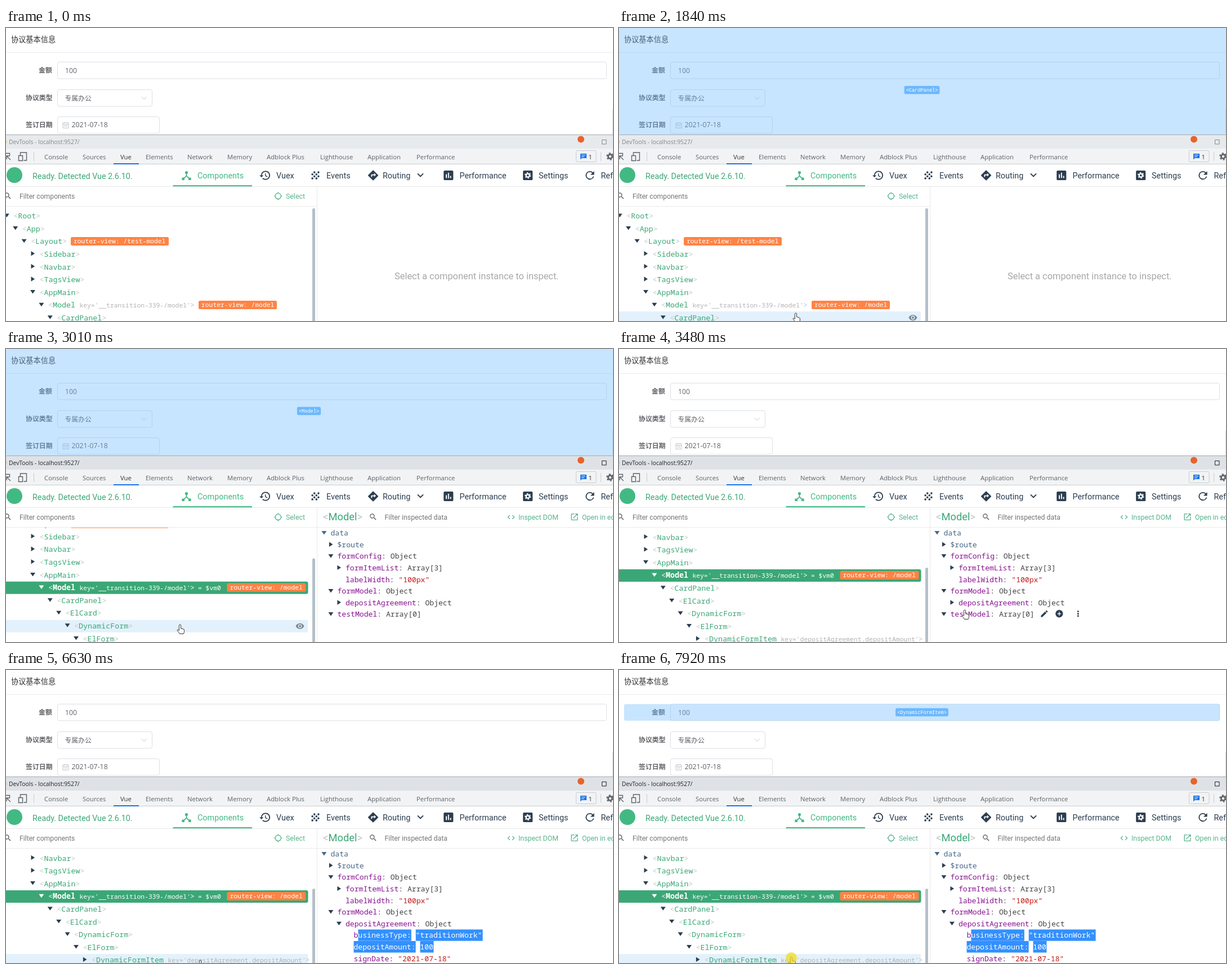
An HTML page for the animation above (8 s loop, 1078x520 px).

```html
<!DOCTYPE html>
<html lang="zh">
<head>
<meta charset="utf-8">
<style>
html, body { margin: 0; width: 100%; height: 100%; overflow: hidden; background: #fff }
svg { display: block; font-family: Roboto, sans-serif }
text { white-space: pre }
.mono { font-family: "Noto Sans Mono", monospace }
.open { font-family: "Open Sans", "Noto Sans", sans-serif }
.cjk { font-family: "Noto Sans CJK SC", "Noto Sans CJK", sans-serif }
.tip { font-family: "Liberation Mono", monospace }
</style>
</head>
<body>
<svg id="stage" width="1078" height="520" viewBox="0 0 1078 520"></svg>
<script>
const DARK = '#2c3e50', GREEN = '#42b983', NAME = '#3ba776', KEY = '#881391', PLAIN = '#444', RED = '#c41a16';
const LOOP = 8000, ROW = 22.6, TREE_TOP = 322.2, DATA_ROW = 20.6, DATA_TOP = 316.3;

const ICONS = {
  hub: 'M17 16l-4-4V8.82C14.16 8.4 15 7.3 15 6c0-1.66-1.34-3-3-3S9 4.34 9 6c0 1.3.84 2.4 2 2.82V12l-4 4H3v5h5v-3.05l4-4.2 4 4.2V21h5v-5z',
  history: 'M13 3a9 9 0 0 0-9 9H1l4 4 4-4H6a7 7 0 1 1 7 7c-1.93 0-3.68-.79-4.94-2.06l-1.42 1.42A9 9 0 1 0 13 3zm-1 5v5l4.28 2.54.72-1.21-3.5-2.08V8z',
  turn: 'M21.7 11.3l-9-9a1 1 0 0 0-1.4 0l-9 9a1 1 0 0 0 0 1.4l9 9a1 1 0 0 0 1.4 0l9-9a1 1 0 0 0 0-1.4zM14 14.5V12h-4v3H8v-4c0-.55.45-1 1-1h5V7.5l3.5 3.5z',
  down: 'M7.41 8.59L12 13.17l4.59-4.58L18 10l-6 6-6-6z',
  square: 'M19 3H5a2 2 0 0 0-2 2v14a2 2 0 0 0 2 2h14a2 2 0 0 0 2-2V5a2 2 0 0 0-2-2z',
  bars: 'M19 3H5a2 2 0 0 0-2 2v14a2 2 0 0 0 2 2h14a2 2 0 0 0 2-2V5a2 2 0 0 0-2-2zM9 17H7v-7h2zm4 0h-2V7h2zm4 0h-2v-4h2z',
  refresh: 'M17.65 6.35A8 8 0 1 0 19.73 14h-2.08A6 6 0 1 1 12 6c1.66 0 3.14.69 4.22 1.78L13 11h7V4z',
  search: 'M15.5 14h-.79l-.28-.27a6.5 6.5 0 1 0-.7.7l.27.28v.79l5 4.99L20.49 19zm-6 0a4.5 4.5 0 1 1 0-9 4.5 4.5 0 0 1 0 9z',
  code: 'M9.4 16.6L4.8 12l4.6-4.6L8 6l-6 6 6 6zm5.2 0l4.6-4.6-4.6-4.6L16 6l6 6-6 6z',
  open: 'M19 19H5V5h7V3H5a2 2 0 0 0-2 2v14a2 2 0 0 0 2 2h14a2 2 0 0 0 2-2v-7h-2zM14 3v2h3.59l-9.83 9.83 1.41 1.41L19 6.41V10h2V3z',
  edit: 'M3 17.25V21h3.75L17.81 9.94l-3.75-3.75zM20.71 7.04a1 1 0 0 0 0-1.41l-2.34-2.34a1 1 0 0 0-1.41 0l-1.83 1.83 3.75 3.75z',
  addCircle: 'M12 2a10 10 0 1 0 0 20 10 10 0 0 0 0-20zm5 11h-4v4h-2v-4H7v-2h4V7h2v4h4z',
  add: 'M19 13h-6v6h-2v-6H5v-2h6V5h2v6h6z',
  minus: 'M19 13H5v-2h14z',
  trash: 'M6 19a2 2 0 0 0 2 2h8a2 2 0 0 0 2-2V7H6zM19 4h-3.5l-1-1h-5l-1 1H5v2h14z',
  more: 'M10 4h4v4h-4zM10 10h4v4h-4zM10 16h4v4h-4z',
  eye: 'M12 4.5C7 4.5 2.73 7.61 1 12c1.73 4.39 6 7.5 11 7.5s9.27-3.11 11-7.5c-1.73-4.39-6-7.5-11-7.5zM12 17a5 5 0 1 1 0-10 5 5 0 0 1 0 10zm0-8a3 3 0 1 0 0 6 3 3 0 0 0 0-6z'
};

const esc = s => s.replace(/&/g, '&amp;').replace(/</g, '&lt;');
const text = (x, y, s, size, fill = DARK, cls = '', more = '') =>
  `<text x="${x}" y="${y}" font-size="${size}" fill="${fill}" class="${cls}" ${more}>${esc(s)}</text>`;
const rect = (x, y, w, h, fill, more = '') =>
  `<rect x="${x}" y="${y}" width="${w}" height="${h}" fill="${fill}" ${more}/>`;
const path = (d, stroke, width = 1, more = '') =>
  `<path d="${d}" fill="none" stroke="${stroke}" stroke-width="${width}" ${more}/>`;
const circle = (x, y, r, fill, more = '') => `<circle cx="${x}" cy="${y}" r="${r}" fill="${fill}" ${more}/>`;
const group = (id, body, more = '') => `<g id="${id}" ${more}>${body}</g>`;
const at = (x, y, k) => `transform="translate(${x} ${y}) scale(${k}) translate(-12 -12)"`;
const icon = (name, x, y, k = .67, fill = DARK) => `<path d="${ICONS[name]}" fill="${fill}" ${at(x, y, k)}/>`;
const gear = (x, y, r, c) => circle(x, y, r, 'none', `stroke="${c}" stroke-width="${r * .75}"`) +
  circle(x, y, r * 1.6, 'none', `stroke="${c}" stroke-width="${r * .6}" stroke-dasharray="${r * .838}"`);
const arrow = (x, y, open, c = DARK) =>
  `<path d="${open ? 'M-4.5-3h9L0 3.5z' : 'M-3-4.2v8.4L3.6 0z'}" transform="translate(${x} ${y})" fill="${c}"/>`;
const badge = (x, y, s, w) =>
  rect(x, Math.round(y) - 8, w, 15, '#ff8344', 'rx="2.5"') + text(x + 5, y + 3.6, s, 11.35, '#fff', 'mono');

function page() {
  const box = (y, w) => rect(91.5, y, w, 29.5, '#fff', 'stroke="#dcdfe6" rx="3.5"');
  const label = (x, y, s) => text(x, y, s, 11.9, '#606266', 'cjk', 'font-weight="700"');
  return text(9, 24.6, '协议基本信息', 13.2, '#303133', 'cjk') + path('M0 43.5H1078', '#e9ecf2') +
    label(58, 79.4, '金额') + box(60.5, 975) + text(105, 79.6, '100', 12.2, '#606266', 'open') +
    label(35, 128.3, '协议类型') + box(109.5, 168) + text(104.5, 128.6, '专属办公', 11.8, '#606266', 'cjk') +
    path('M241 122.3l4.2 4.2 4.2-4.2', '#c0c4cc') +
    label(35, 176.3, '签订日期') + box(157.5, 181) + text(116.5, 176.4, '2021-07-18', 12.3, '#606266', 'open') +
    path('M101 168.5h10v9h-10zM101 171.5h10M103.5 167v2M108.5 167v2M103 174h6', '#c0c4cc') +
    rect(1077, 145, 1, 45, '#d9dbde');
}

function overlay(name, x, y, w, h, cy) {
  const label = `<${name}>`, width = label.length * 5.16 + 6;
  return group('full-' + name, rect(x, y, w, h, '#68b6ff', 'fill-opacity=".36" rx="3"') +
    rect(538 - width / 2, cy - 7.3, width, 14.6, '#6db8fd', 'rx="2.5"') +
    text(538, cy + 3, label, 8.6, '#fff', 'tip', 'text-anchor="middle"'));
}

function chrome() {
  const tabs = { Console: 68, Sources: 136, Vue: 203, Elements: 248, Network: 322, Memory: 393,
    'Adblock Plus': 463, Lighthouse: 558, Application: 642, Performance: 729 };
  const nav = { Vuex: 480, Events: 569, Routing: 669, Performance: 805.5, Settings: 946, Refresh: 1056.5 };
  return rect(0, 189, 1078, 331, '#fff') + rect(0, 190, 1078, 24, '#e7eaed', 'id="bar"') +
    rect(0, 189, 1078, 1, '#a4a8ac') + circle(-3, 202, 4, '#d9c27a') +
    group('title', text(5, 205.7, 'DevTools - localhost:9527/', 10.35, 'currentColor', 'open') +
      path('M1058.5 198.5h7.5v7.5h-7.5z', 'currentColor')) + circle(1021, 197.5, 6, '#e8632c') +
    rect(0, 214, 1078, 28, '#f1f3f4') + path('M0 241.5H1078', '#cacdd1') +
    Object.entries(tabs).map(([s, x]) => text(x, 232.5, s, 11.3, s === 'Vue' ? '#333' : '#5f6368', 'open')).join('') +
    rect(191, 240, 45, 2, '#1a73e8') +
    path('M0 222.5h6.5v4M1 227l7 7M1 233v-6h6', '#5f6368', 1.4) +
    path('M25.5 226v-5h11v14h-5M22.5 226.5h7v9h-7z', '#5f6368', 1.4) +
    path('M49.5 220v16M1056.5 220v16', '#cacdd1') +
    rect(1012.5, 217.5, 35.5, 20, '#f1f3f4', 'stroke="#cacdd1" rx="2"') +
    '<path d="M1020 223h11v8h-8.5l-2.5 2.5z" fill="#1a73e8"/>' + path('M1022 225.5h7M1022 228.5h5', '#fff') +
    text(1034.5, 232.5, '1', 11.3, '#333', 'open') + gear(1073, 228, 3.6, '#5f6368') +
    circle(15, 261, 14, GREEN) + text(47, 268.2, 'Ready. Detected Vue 2.6.10.', 14.3, NAME) +
    icon('hub', 320.5, 262, .9, GREEN) + text(340, 266.5, 'Components', 14.4, GREEN) +
    Object.entries(nav).map(([s, x]) => text(x, 266.5, s, 14.4)).join('') +
    icon('history', 460, 261.5, .9) + icon('turn', 652, 261.5, .9) + icon('down', 736, 261, .95) +
    path('M10 6h0M18 6h0M6 10h0M14 10h0M10 14h0M18 14h0M6 18h0M14 18h0', DARK, 4,
      `stroke-linecap="round" ${at(549.5, 261.5, .9)}`) +
    icon('bars', 785.8, 261.5, .95) + icon('square', 926.7, 261.5, .95) + gear(926.7, 261.5, 3, '#fff') +
    icon('refresh', 1037, 261.5, .95) +
    path('M0 281.5H1078', '#e8e8e8') + rect(296.5, 279, 140.5, 2, GREEN) +
    path('M552.5 282V520M0 316.5H552', '#eaeaea') +
    icon('search', 3, 298, .65, '#555') + text(24, 302.5, 'Filter components', 12.2, '#757575') +
    path('M12 4a8 8 0 1 0 .01 0M12 1v3M12 20v3M1 12h3M20 12h3', '#57b48c', 2, at(483.3, 298.3, .65)) +
    text(497, 302.5, 'Select', 12.35, '#57b48c');
}

// name, depth, expanded, key attribute
const tree = [['Root', 0, 1], ['App', 1, 1], ['Layout', 2, 1], ['Sidebar', 3, 0], ['Navbar', 3, 0], ['TagsView', 3, 0],
  ['AppMain', 3, 1], ['Model', 4, 1, '__transition-339-/model'], ['CardPanel', 5, 1], ['ElCard', 6, 1],
  ['DynamicForm', 7, 1], ['ElForm', 8, 1], ['DynamicFormItem', 9, 0, 'depositAgreement.depositAmount']];
const MODEL = 7;
const treeY = i => 333.5 + ROW * i;

function treeRow([name, depth, open, key], i, selected) {
  const x = 13.3 + 15.4 * depth, y = treeY(i), pick = c => selected ? '#fff' : c;
  let end = x + 8 + name.length * 8.01, out = arrow(x - 12, y - 1, open, pick(DARK));
  out += text(x, y + 4.6, '<', 13.35, pick('#c4c4c4'), 'mono') +
    text(x + 8, y + 4.6, name, 13.35, pick(NAME), 'mono', selected ? 'font-weight="700"' : '');
  if (key) {
    const attr = `key='${key}'`;
    out += text(end + 7.5, y + 4.2, attr, 11.35, pick('#b3b3b3'), 'mono');
    end += 6.5 + attr.length * 6.81;
  }
  return out + text(end, y + 4.6, '>', 13.35, pick('#c4c4c4'), 'mono');
}

function treePane() {
  const y = treeY(MODEL);
  return `<clipPath id="treeClip">${rect(0, 317, 552, 203, '#000')}</clipPath><g clip-path="url(#treeClip)">` +
    group('tree',
      group('hover', rect(0, -11, 536, 22, '#e3f1fc') + group('eye', icon('eye', 522, 0, .68, '#7b8790'))) +
      tree.map((r, i) => i === MODEL ? '' : treeRow(r, i)).join('') +
      badge(115, treeY(2), 'router-view: /test-model', 174) +
      group('idle', treeRow(tree[MODEL], MODEL) + badge(342, y, 'router-view: /model', 139)) +
      group('chosen', rect(-4, 481, 540.5, 22, NAME, 'rx="3"') + treeRow(tree[MODEL], MODEL, true) +
        text(341, y + 4.2, '= $vm0', 11.35, '#fff', 'mono') + badge(392.5, y, 'router-view: /model', 140))) +
    '</g>' + rect(544, 320, 5, 300, '#b4bfc9', 'id="thumb" rx="2.5"');
}

// depth, arrow (1 open, 0 closed, -1 none), key, value, value colour, hover tools with offsets
const agreement = open => [2, open, 'depositAgreement', 'Object', PLAIN, { edit: 18, addCircle: 44, trash: 80, more: 113 }];
const data = {
  head: [[0, 1, 'data', ''], [1, 0, '$route', ''], [1, 1, 'formConfig', 'Object', PLAIN], [2, 0, 'formItemList', 'Array[3]', PLAIN],
    [2, -1, 'labelWidth', '"100px"', RED], [1, 1, 'formModel', 'Object', PLAIN]],
  closed: [agreement(0), [1, 1, 'testModel', 'Array[0]', PLAIN, { edit: 17.5, addCircle: 44, more: 77.5 }]],
  opened: [agreement(1),
    [3, -1, 'businessType', '"traditionWork"', RED, { edit: 17, trash: 54, more: 87 }],
    [3, -1, 'depositAmount', '100', '#1c00cf', { edit: 17, minus: 43, add: 70, trash: 107, more: 140 }],
    [3, -1, 'signDate', '"2021-07-18"', RED]]
};
const dataY = i => DATA_TOP + DATA_ROW * (i + .5);

function dataRow([depth, open, key, value, color, tools], i, white) {
  const x = [576.5, 588.5, 603, 617.5][depth], y = dataY(i);
  const length = value ? key.length + 2 + value.length : key.length;
  const span = (c, s) => `<tspan fill="${white ? '#fff' : c}">${s}</tspan>`;
  let out = `<text x="${x}" y="${y + 4.5}" font-size="13.1" class="mono">` +
    (value ? span(KEY, key) + span(PLAIN, ': ') + span(color, value) : span('#486887', key)) + '</text>';
  if (open >= 0) out += arrow(x - 11.6, y - .5, open, depth ? DARK : '#486887');
  if (tools && !white) out += `<g class="tools" data-line="${i}">` + Object.entries(tools)
    .map(([n, dx]) => icon(n, x + length * 7.86 + dx, y - 1)).join('') + '</g>';
  return out;
}

// selectable runs: left, right, line
const runs = [[625.4, 719.8, 0], [727.7, 846.6, 0], [617.5, 727.6, 1], [735.5, 759.4, 1]];

function dataPane() {
  const rows = (list, from) => list.map((r, i) => dataRow(r, from + i)).join('');
  return text(690, 446, 'Select a component instance to inspect.', 16.4, '#a5a8ab', '', 'id="empty"') +
    group('panel', text(563, 304, '<', 18.3, '#c4c4c4') + text(572.5, 304, 'Model', 18.3, NAME) +
      text(623.5, 304, '>', 18.3, '#c4c4c4') + icon('search', 652, 298, .65, '#555') +
      text(672.5, 302.5, 'Filter inspected data', 12.3, '#757575') +
      icon('code', 897, 298.3, .65, '#57b48c') + text(910, 302.5, 'Inspect DOM', 12.35, '#57b48c') +
      icon('open', 1009.5, 298, .67, '#57b48c') + text(1023, 302.5, 'Open in editor', 12.35, '#57b48c') +
      path('M553 316.5H1078', '#eaeaea') +
      rows(data.head, 0) + group('closed', rows(data.closed, 6)) + group('opened', rows(data.opened, 6)) +
      '<clipPath id="marked">' +
      runs.map(([l, , line]) => rect(l, dataY(7 + line) - 10.3, 0, 20.3, '#000', 'class="run"')).join('') + '</clipPath>' +
      `<g clip-path="url(#marked)">${rect(610, 455, 250, 50, '#3390ff')}` +
      `${dataRow(data.opened[1], 7, true)}${dataRow(data.opened[2], 8, true)}</g>`);
}

const stage = document.getElementById('stage');
stage.innerHTML = page() + overlay('CardPanel', 0, 0, 1078, 189, 110) + overlay('Model', 0, 0, 1078, 189, 110) +
  overlay('DynamicFormItem', 9, 60.5, 1058, 29.5, 75) + chrome() + treePane() + dataPane() +
  group('pointer', '<path d="M-1.6-.3a1.6 1.6 0 0 1 3.2 0V5l4.2.9q1.7.5 1.7 2.3v2q0 2-1.2 4.3h-7q-1-2.6-4-5.7-.6-2 1.4-1.6l1.7 1.4z" fill="#fff" stroke="#333"/>' +
    circle(0, 0, 10, '#f0dc20', 'id="press" opacity=".75"'));

const $ = id => document.getElementById(id);
const show = (el, on) => el.style.display = on ? '' : 'none';
const tools = [...document.querySelectorAll('.tools')], runRects = [...document.querySelectorAll('.run')];

// time, x, y; y beyond 520 is off stage
const route = [[0, 400, 540], [520, 400, 540], [590, 380, 519], [870, 335, 510], [1070, 335, 510], [1280, 322, 485],
  [1480, 314, 490], [1550, 312, 497], [1630, 314, 508], [1840, 314, 508], [1910, 310, 496], [1980, 309, 491],
  [3080, 309, 491], [3480, 614, 465], [3690, 611, 465], [3830, 605.5, 448], [4300, 605.5, 448], [4720, 657, 482],
  [4940, 627, 468], [5210, 627, 468], [5760, 776, 490], [6200, 776, 490], [6430, 790, 540], [6629, 345, 540],
  [6630, 345, 517], [6770, 346, 514], [6780, 346, 540], [7509, 310, 540], [7510, 309, 517], [7720, 306, 511], [LOOP, 306, 511]];
const presses = [[2250, 2470], [4100, 4300], [5210, 6200], [7920, LOOP]];
const clamp = (v, lo, hi) => Math.min(hi, Math.max(lo, v));

function cursor(t) {
  const i = route.findIndex(k => k[0] > t), [t0, x0, y0] = route[i - 1], [t1, x1, y1] = route[i];
  const p = (t - t0) / (t1 - t0);
  return [x0 + (x1 - x0) * p, y0 + (y1 - y0) * p];
}
function scrollAt(t) {
  const p = clamp((t - 2940) / 140, 0, 1);
  return 90 * p * (2 - p);
}
function hovered(t) {
  const [x, y] = cursor(Math.max(0, t));
  return x < 536 && y < 520 ? Math.floor((y + scrollAt(t) - TREE_TOP) / ROW) : -1;
}

function render(t) {
  const [x, y] = cursor(t), scroll = scrollAt(t), row = hovered(t);
  const active = t >= 2250, chosen = t >= 2470, opened = t >= 4300;

  $('bar').setAttribute('fill', active ? '#dee2e7' : '#e7eaed');
  $('title').style.color = active ? '#222' : '#858585';
  $('tree').setAttribute('transform', `translate(0 ${-scroll})`);
  $('thumb').setAttribute('y', 320 + scroll * .755);
  show($('hover'), row >= 0 && row < tree.length);
  $('hover').setAttribute('transform', `translate(0 ${Math.round(treeY(row))})`);
  show($('eye'), row < 12);
  show($('idle'), !chosen);
  show($('chosen'), chosen);

  // the page highlight trails the pointer slightly
  const lit = tree[hovered(t - 70)];
  for (const name of ['CardPanel', 'Model', 'DynamicFormItem']) show($('full-' + name), lit && lit[0] === name);

  show($('empty'), t < 2540);
  show($('panel'), t >= 2540);
  show($('closed'), !opened);
  show($('opened'), opened);
  const line = x > 553 && y < 502 ? Math.floor((y - DATA_TOP) / DATA_ROW) : -1;
  for (const el of tools) show(el, +el.dataset.line === line);

  const secondLine = t >= 5760 || y > dataY(7) + 10.3, edge = t >= 5760 ? 900 : x;
  runs.forEach(([l, r, n], i) => {
    const reach = t < 5210 || n && !secondLine ? 0 : !n && secondLine ? r : edge;
    runRects[i].setAttribute('width', clamp(reach - l, 0, r - l));
  });

  show($('pointer'), y < 525);
  $('pointer').setAttribute('transform', `translate(${x} ${y})`);
  show($('press'), presses.some(([a, b]) => t >= a && t < b));
}

const start = performance.now();
function frame() {
  render((performance.now() - start) % LOOP);
  requestAnimationFrame(frame);
}
frame();
</script>
</body>
</html>
```
